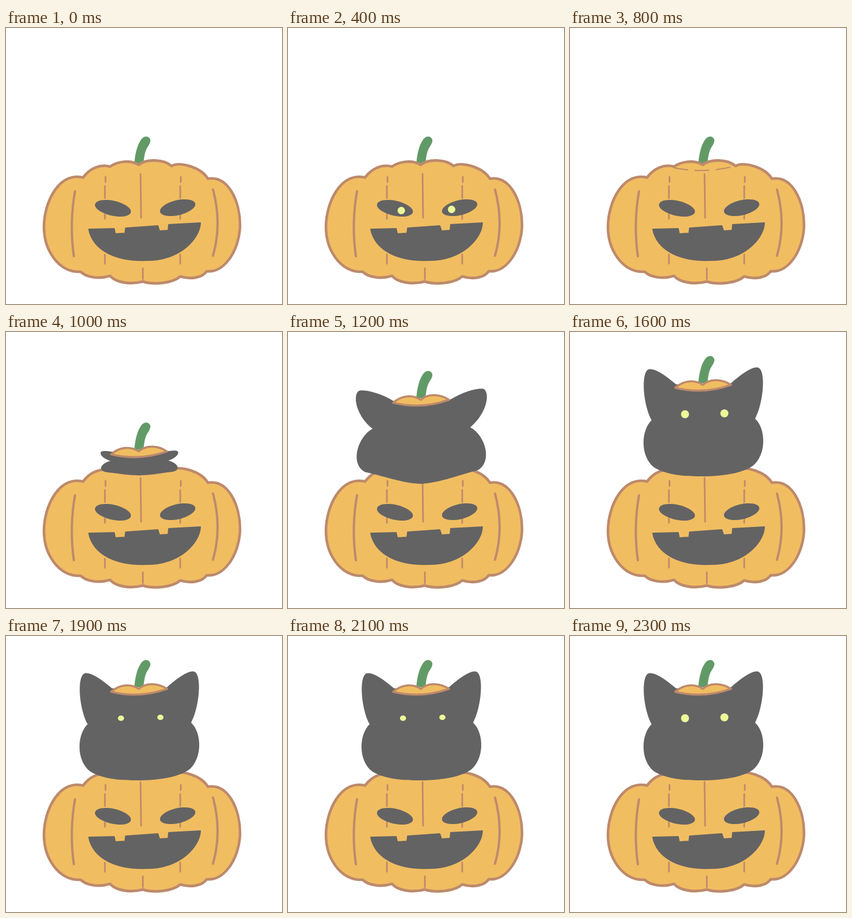
Write an HTML page with a canvas that moves like this. It is 480 px wide and 480 px high and loops after 2400 ms.

```html
<!DOCTYPE html>
<html>
<head>
<meta charset="utf-8">
<title>Pumpkin cat</title>
<style>
html, body { margin: 0; width: 100%; height: 100%; overflow: hidden; background: #fff; }
canvas { display: block; width: 480px; height: 480px; }
</style>
</head>
<body>
<canvas id="stage" width="480" height="480"></canvas>
<script>
const ctx = document.getElementById('stage').getContext('2d');
const STEP = 100, STEPS = 24, MID = 232, RIM_Y = 244;
const ORANGE = '#f1bd61', BROWN = '#bd8a6c', DARK = '#636363', GREEN = '#629a67', GLOW = '#ecfb98';

const clamp = v => Math.max(0, Math.min(1, v));
const lerp = (a, b, k) => a + (b - a) * k;
const smooth = k => k * k * (3 - 2 * k);
const path = d => new Path2D(d);

// Body: the two top lobes give way to a rim once the lid comes off.
const LEFT_TOP = 'M134 260 C146 244 164 236 181 241';
const CROWN = 'C192 233 214 228 231 238 C244 227 274 228 288 240';
const RIM = 'Q231 254 288 240';
const SIDES = 'C302 231 340 243 351 262 C388 256 407 304 407 342 C407 380 384 426 349 423'
  + 'C342 434 322 438 303 432 C290 444 258 447 238 441 C214 447 190 442 181 431'
  + 'C162 437 140 434 130 424 C90 425 66 385 66 346 C66 303 92 250 134 260 Z';
const CLOSED = path(LEFT_TOP + CROWN + SIDES);
const OPENED = path(LEFT_TOP + RIM + SIDES);
const CUT = path('M181 243' + RIM);
const LID = path('M183 244 C195 233 214 228 231 239 C244 227 265 229 280 239 Q231 256 183 244 Z');
const STEM = path('M223 236 C225 217 228 204 235 194 C240 187 248 187 251 194'
  + 'C252 200 247 205 244 211 C241 218 240 226 239 236 Z');
const MOUTH = path('M144 350 L188 349 L190 358 L207 357 L208 348 L264 344 L267 353 L282 352 L283 342'
  + 'L338 339 C337 366 303 404 245 404 C193 406 152 388 144 350 Z');
const RIBS = path('M120 284 Q110 340 118 397 M360 281 Q376 340 360 396');
const SEAMS = path('M234 254 L235 330 M238 418 V437'
  + [172, 303].map(x => `M${x + 1} 259 V268 M${x} 275 V296 M${x} 324 V332 M${x} 394 V410`).join(''));

// Right half of the cat: ear base, then cubic controls for ear, cheek and chin.
const SQUEEZED = [[49,119], [70,106],[92,100],[105,100], [120,100],[118,140],[85,167],
  [112,182],[124,228],[98,242], [70,248],[32,263],[0,264]];
const SETTLED = [[48,90], [65,75],[82,63],[93,63], [110,63],[105,125],[90,152],
  [109,170],[110,215],[86,234], [65,248],[30,251],[0,251]];
const TILT = 0.015;

function paint(shape, color, edge, width) {
  ctx.fillStyle = color;
  ctx.fill(shape);
  if (edge) stroke(shape, width, edge);
}

function stroke(shape, width, color = BROWN) {
  ctx.strokeStyle = color;
  ctx.lineWidth = width;
  ctx.stroke(shape);
}

function oval(x, y, rx, ry, angle, color) {
  ctx.beginPath();
  ctx.ellipse(x, y, rx, ry, angle, 0, Math.PI * 2);
  ctx.fillStyle = color;
  ctx.fill();
}

function glow(x, y, r, open) {
  if (open) oval(x, y, r * (0.3 + 0.7 * open), r * open, 0, GLOW);
}

function face(open) {
  oval(186, 313.5, 32, 13, 0.22, DARK);
  oval(298.5, 312.5, 31.5, 13, -0.23, DARK);
  paint(MOUTH, DARK, DARK, 2);
  glow(197, 317.5, 6.5, open);
  glow(284.5, 315.5, 6.5, open);
}

function pumpkin(open) {
  paint(open ? OPENED : CLOSED, ORANGE, BROWN, 4.6);
  stroke(RIBS, 4);
  stroke(SEAMS, 2.8);
}

function lid(rise) {
  ctx.save();
  ctx.translate(0, -rise);
  paint(STEM, GREEN);
  paint(LID, ORANGE, BROWN, 3.6);
  ctx.restore();
}

function cat(pop, settle, open) {
  const half = SQUEEZED.map(([x, y], i) =>
    [lerp(x, SETTLED[i][0], settle), lerp(y, SETTLED[i][1], settle)]);
  ctx.save();
  ctx.translate(MID, RIM_Y);
  ctx.scale(lerp(0.45, 1, pop), pop);
  ctx.translate(0, -RIM_Y);
  ctx.fillStyle = DARK;
  for (const side of [-1, 1]) {
    const at = i => [side * half[i][0], half[i][1] - TILT * side * half[i][0]];
    ctx.beginPath();
    ctx.moveTo(-side, half[0][1] + 7);
    ctx.lineTo(...at(0));
    for (let i = 1; i < half.length; i += 3) {
      ctx.bezierCurveTo(...at(i), ...at(i + 1), ...at(i + 2));
    }
    ctx.lineTo(-side, half[12][1]);
    ctx.fill();
  }
  ctx.restore();
  glow(200, 143, 7, open);
  glow(268.5, 141.5, 7, open);
}

function draw(step) {
  const peek = clamp(Math.min(step - 1, 7 - step) / 2);
  const pop = smooth(clamp((step - 9) / 3));
  const settle = Math.sin(clamp((step - 12) / 2) * Math.PI / 2);
  const blink = Math.min(1, 0.13 + 0.54 * Math.abs(step - 20));
  const gaze = Math.min(clamp((step - 14) / 2), blink);

  ctx.fillStyle = '#fff';
  ctx.fillRect(0, 0, 480, 480);
  ctx.lineJoin = ctx.lineCap = 'round';
  if (!pop) paint(STEM, GREEN);
  pumpkin(pop > 0);
  if (pop) {
    cat(pop, settle, gaze);
    lid(lerp(121 * pop, 147, settle));
  } else if (step >= 8) {
    ctx.setLineDash(step === 8 ? [24, 13] : []);
    stroke(CUT, 2);
    ctx.setLineDash([]);
  }
  face(peek);
}

function tick(now) {
  draw(Math.floor(now / STEP) % STEPS);
  requestAnimationFrame(tick);
}
draw(0);
requestAnimationFrame(tick);
</script>
</body>
</html>
```
